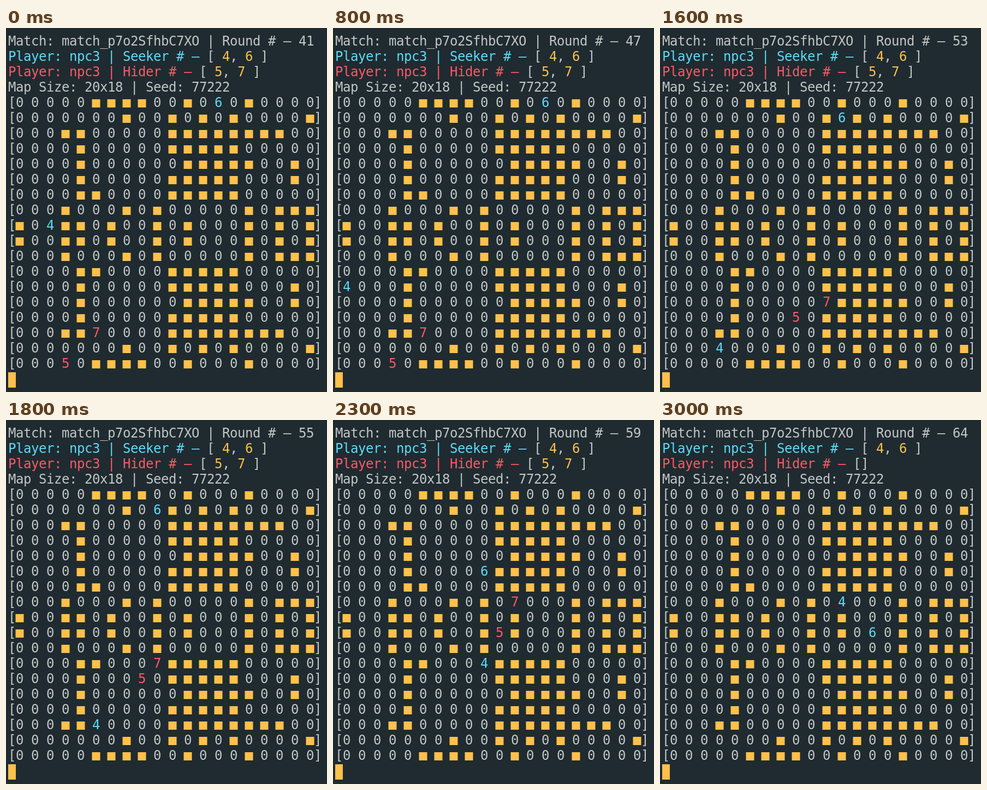
Recreate the animation shown at these times as an HTML page. Size 588 by 664 pixels, loop 3.1 s.

```html
<!DOCTYPE html>
<html lang="en">
<head>
<meta charset="utf-8">
<title>Hide and seek</title>
<style>
  html, body { margin: 0; width: 100%; height: 100%; overflow: hidden; background: #1f2b30; }
  svg { display: block; }
  text {
    font: 24px "DejaVu Sans Mono", monospace;
    letter-spacing: -.45px;
    white-space: pre;
    fill: #c3c6c5;
  }
  .seeker { fill: #5ddaf7; }
  .hider { fill: #ff5866; }
  .gold { fill: #ffc04c; }
</style>
</head>
<body>
<svg id="term" width="588" height="664" viewBox="0 0 588 664"></svg>
<script>
const CELL = 14, LINE = 28, LEFT = 4, TOP = 12, BASE = 20;
const STEP = 100, LOOP = 3100, FIRST = 41, RATE = .77, PHASE = .64;

// Upper half of the map; the lower half mirrors it.
const HALF = [
  '.....####..#...#....',
  '.......#..#.#.#....#',
  '...##.....########..',
  '....#.....#####.....',
  '....#......#####..#.',
  '....#.....#####...#.',
  '....##....#####.....',
  '...#...#.#.....#.###',
  '#..##.#..#.#...#.#.#'
];
const MAP = [...HALF, ...[...HALF].reverse()];

// One move per round, as numpad directions; a hider is gone after its last move.
const PIECES = [
  { id: 4, side: 'seeker', col: 2, row: 8, moves: '25421222233969999998886' },
  { id: 6, side: 'seeker', col: 13, row: 0, moves: '55555555554171222223633' },
  { id: 5, side: 'hider', col: 3, row: 17, moves: '5555555969968868988' },
  { id: 7, side: 'hider', col: 5, row: 15, moves: '5555555669967898896622' }
];

const term = document.getElementById('term');

function add(tag, attrs, parent = term) {
  const node = document.createElementNS('http://www.w3.org/2000/svg', tag);
  for (const key in attrs) node.setAttribute(key, attrs[key]);
  return parent.appendChild(node);
}

function print(line, col, str = '', cls = '') {
  const node = add('text', { x: LEFT + col * CELL, y: TOP + line * LINE + BASE, class: cls });
  node.textContent = str;
  return node;
}

const title = print(0, 0);
const lists = ['seeker', 'hider'].map((side, i) => {
  const label = `Player: npc3 | ${side[0].toUpperCase() + side.slice(1)} # –`;
  print(1 + i, 0, label, side);
  return { side, node: print(1 + i, label.length + 1) };
});
print(3, 0, 'Map Size: 20x18 | Seed: 77222');

const cells = MAP.map((str, row) => {
  const line = row + 4;
  print(line, 0, '[');
  print(line, 40, ']');
  return [...str].map((ch, col) => {
    if (ch === '.') return print(line, 1 + 2 * col, '0');
    return add('rect', {
      x: LEFT + (1 + 2 * col) * CELL - .5, y: TOP + line * LINE + 6,
      width: 15, height: 15, class: 'gold'
    });
  });
});
add('rect', { x: LEFT, y: TOP + 22 * LINE, width: CELL, height: LINE, class: 'gold' });

function locate(piece, age) {
  let { col, row } = piece;
  for (const ch of piece.moves.slice(0, age)) {
    col += (ch - 1) % 3 - 1;
    row += 1 - Math.floor((ch - 1) / 3);
  }
  return cells[row][col];
}

function showList(node, ids) {
  node.textContent = '';
  const span = (str, cls = '') => { add('tspan', { class: cls }, node).textContent = str; };
  if (!ids.length) return span('[]');
  span('[ ');
  ids.forEach((id, i) => {
    if (i) span(', ');
    span(id, 'gold');
  });
  span(' ]');
}

let shown = -1, used = [];

function draw(age) {
  if (age === shown) return;
  shown = age;
  title.textContent = `Match: match_p7o2SfhbC7XO | Round # – ${FIRST + age}`;
  for (const cell of used) {
    cell.textContent = '0';
    cell.setAttribute('class', '');
  }
  const alive = PIECES.filter(p => age <= p.moves.length);
  used = alive.map(p => {
    const cell = locate(p, age);
    cell.textContent = p.id;
    cell.setAttribute('class', p.side);
    return cell;
  });
  for (const { side, node } of lists) {
    showList(node, alive.filter(p => p.side === side).map(p => p.id));
  }
}

function tick() {
  const step = Math.floor(performance.now() % LOOP / STEP);
  draw(Math.floor(PHASE + RATE * step));
  requestAnimationFrame(tick);
}
tick();
</script>
</body>
</html>
```
